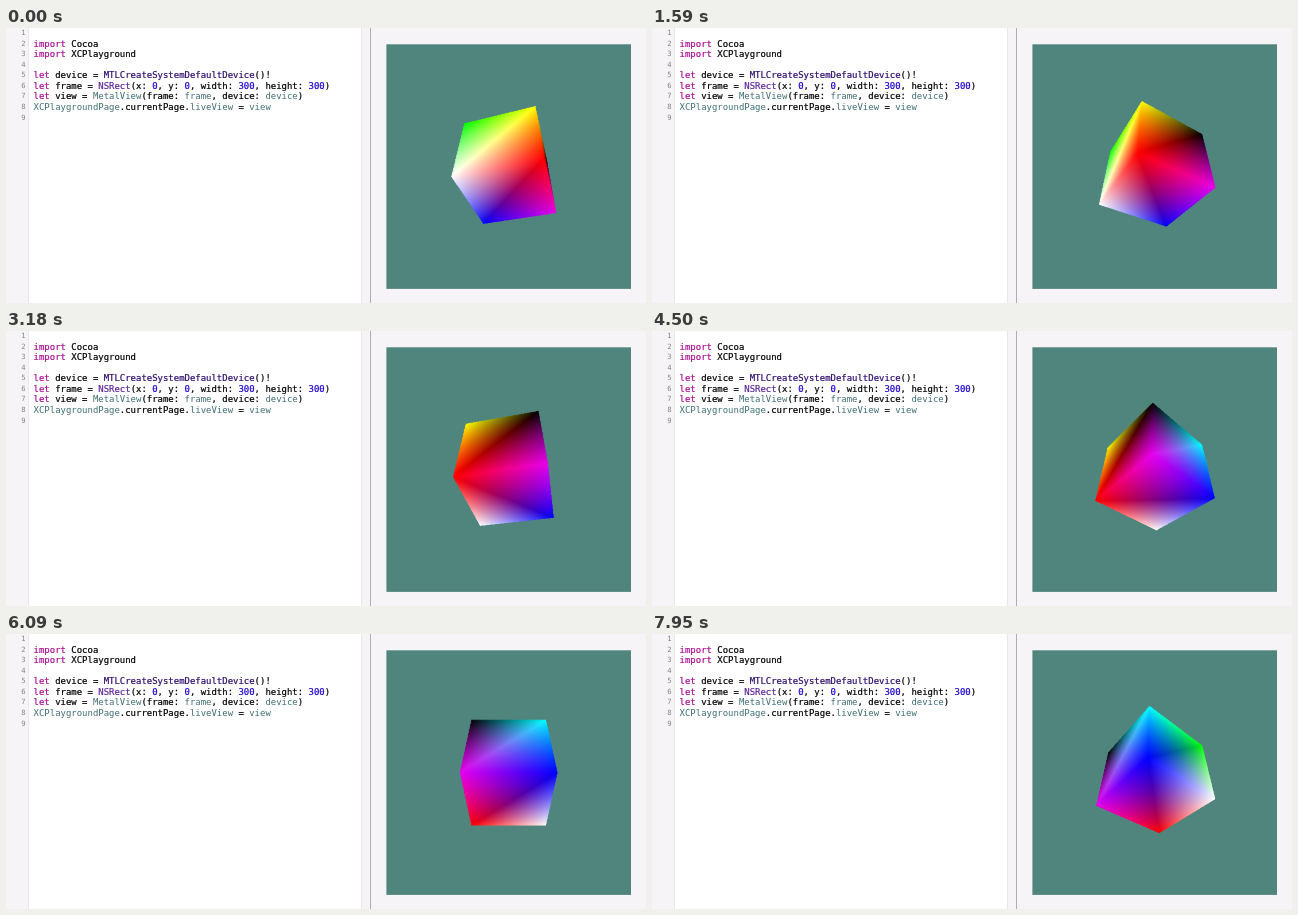
These frames come from a looping animation (640x275 px, 8 s). An HTML page with a canvas:

```html
<!DOCTYPE html>
<html lang="en">
<head>
<meta charset="utf-8">
<title>Rotating cube</title>
<style>
  html, body { margin: 0; width: 100%; height: 100%; overflow: hidden; background: #f6f4f7; }
  .editor, .divider, pre, canvas { position: absolute; margin: 0; }
  .editor { left: 22px; top: 0; width: 334px; height: 275px; background: #fff; border: solid #e9e7ea; border-width: 0 1px; box-sizing: border-box; }
  .divider { left: 364px; top: 0; width: 1px; height: 275px; background: #b0aeb1; }
  pre { top: 0; font: 8.96px/10.56px "DejaVu Sans Mono", monospace; color: #000; }
  .code { left: 27.6px; -webkit-text-stroke: 0.2px; }
  .lines { left: 0; width: 19.5px; text-align: right; font-size: 7.2px; color: #858388; }
  .k { color: #aa0d91; }
  .f { color: #2e0d6e; }
  .t { color: #5c2699; }
  .n { color: #1c00cf; }
  .p { color: #3f6e74; -webkit-text-stroke: 0; }
  canvas { left: 370px; top: 0; }
</style>
</head>
<body>
<div class="editor"></div>
<div class="divider"></div>
<pre class="lines">1
2
3
4
5
6
7
8
9</pre>
<pre class="code">&nbsp;
<span class="k">import</span> Cocoa
<span class="k">import</span> XCPlayground

<span class="k">let</span> device = <span class="f">MTLCreateSystemDefaultDevice</span>()!
<span class="k">let</span> frame = <span class="t">NSRect</span>(x: <span class="n">0</span>, y: <span class="n">0</span>, width: <span class="n">300</span>, height: <span class="n">300</span>)
<span class="k">let</span> view = <span class="p">MetalView</span>(frame: <span class="p">frame</span>, device: <span class="p">device</span>)
<span class="p">XCPlaygroundPage</span>.currentPage.<span class="p">liveView</span> = <span class="p">view</span>
</pre>
<canvas id="view" width="270" height="275"></canvas>
<script>
const LOOP = 8000, FPS = 22;
const START_DEG = 15.5, DEG_PER_SECOND = 27;
const FOCAL = 1 / Math.tan(0.5), CAMERA = 3;
const VIEW = { x: 10.4, y: 16.3, size: 244.6 };

// The cube is shaded at double size and scaled down for smooth edges.
const SIZE = 490;
const ctx = document.getElementById('view').getContext('2d');
const buffer = document.createElement('canvas');
buffer.width = buffer.height = SIZE;
const bufferCtx = buffer.getContext('2d');
const image = bufferCtx.createImageData(SIZE, SIZE);
const pixels = new Uint32Array(image.data.buffer);

// Each corner: position, then colour.
const corners = [
  [-1, -1,  1, 1, 1, 1], [1, -1,  1, 1, 0, 0], [1, 1,  1, 1, 1, 0], [-1, 1,  1, 0, 1, 0],
  [-1, -1, -1, 0, 0, 1], [1, -1, -1, .9, 0, .93], [1, 1, -1, 0, 0, 0], [-1, 1, -1, 0, 1, 1]
];
// Each face splits along the diagonal from its first to its third corner.
const faces = ['2301', '1562', '6732', '4510', '3740', '7654'];

function project([x, y, z, r, g, b], yaw) {
  const c = Math.cos(yaw) / 2, s = Math.sin(yaw) / 2;
  const turnedX = x * c - z * s, turnedZ = z * c + x * s;
  const tiltedY = (y / 2 + turnedZ) * Math.SQRT1_2;
  const tiltedZ = (turnedZ - y / 2) * Math.SQRT1_2;
  const inverse = 1 / (CAMERA - tiltedZ);
  const scale = FOCAL * inverse * SIZE / 2;
  return {
    x: SIZE / 2 + turnedX * scale,
    y: SIZE / 2 - tiltedY * scale,
    inverse, rgb: [r, g, b]
  };
}

const cross = (a, b, x, y) => (b.x - a.x) * (y - a.y) - (b.y - a.y) * (x - a.x);

function fillTriangle(a, b, c) {
  const area = cross(a, b, c.x, c.y);
  const xs = [a.x, b.x, c.x], ys = [a.y, b.y, c.y];
  const right = Math.ceil(Math.max(...xs)), bottom = Math.ceil(Math.max(...ys));
  for (let y = Math.floor(Math.min(...ys)); y < bottom; y++) {
    for (let x = Math.floor(Math.min(...xs)); x < right; x++) {
      let u = cross(b, c, x + .5, y + .5) / area;
      let v = cross(c, a, x + .5, y + .5) / area;
      let w = 1 - u - v;
      if (u < -1e-6 || v < -1e-6 || w < -1e-6) continue;
      // Perspective-correct colour
      u *= a.inverse; v *= b.inverse; w *= c.inverse;
      const gain = 255 / (u + v + w);
      const channel = i => Math.max(0, Math.min(255,
        Math.round((u * a.rgb[i] + v * b.rgb[i] + w * c.rgb[i]) * gain)));
      pixels[y * SIZE + x] = 0xff000000 | channel(2) << 16 | channel(1) << 8 | channel(0);
    }
  }
}

function drawCube(yaw) {
  pixels.fill(0);
  const points = corners.map(corner => project(corner, yaw));
  for (const face of faces) {
    const [a, b, c, d] = [...face].map(i => points[i]);
    if (cross(a, b, c.x, c.y) >= 0) continue;
    fillTriangle(a, b, c);
    fillTriangle(a, c, d);
  }
  bufferCtx.putImageData(image, 0, 0);

  const { x, y, size } = VIEW;
  ctx.clearRect(0, 0, 270, 275);
  ctx.fillStyle = '#50857e';
  ctx.fillRect(x, y, size, size);
  ctx.imageSmoothingQuality = 'high';
  ctx.drawImage(buffer, x, y, size, size);
}

let lastStep = -1;
function tick() {
  const time = performance.now() % LOOP;
  const step = Math.floor((time + 5) * FPS / 1000);
  if (step !== lastStep) {
    lastStep = step;
    drawCube((START_DEG + DEG_PER_SECOND * step / FPS) * Math.PI / 180);
  }
  requestAnimationFrame(tick);
}
tick();
</script>
</body>
</html>
```
